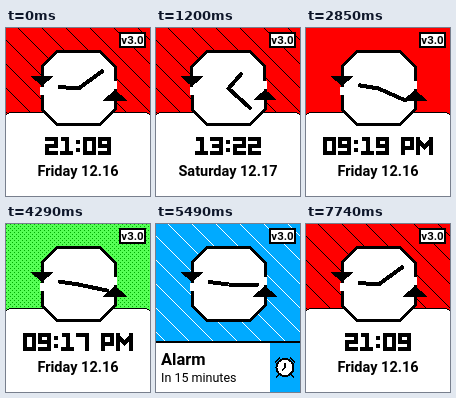
These frames come from a looping animation (144 px wide and 168 px high, 8.49 s). An HTML page:

```html
<!DOCTYPE html>
<html lang="en">
<head>
<meta charset="utf-8">
<title>Watch face</title>
<style>
html, body { margin: 0; width: 100%; height: 100%; overflow: hidden; background: #f00; }
svg { display: block; width: 100vw; height: 100vh; shape-rendering: crispEdges; }
text { font-family: Roboto, "Open Sans", sans-serif; font-weight: 700; }
.ink { fill: none; stroke: #000; }
</style>
</head>
<body>
<svg viewBox="0 0 144 168">
  <defs>
    <pattern id="tile" patternUnits="userSpaceOnUse" width="24" height="24">
      <path id="mark" fill="none"/>
    </pattern>
  </defs>
  <rect id="back" width="144" height="168"/>
  <rect width="144" height="168" fill="url(#tile)"/>

  <g id="panel">
    <path d="M-1 170V91Q-1 84.5 6 84.5H138Q145 84.5 145 91V170Z" fill="#fff" stroke="#000"/>
    <path id="digits" class="ink" stroke-width="4" role="img"/>
    <text id="date" x="72" y="148" font-size="14.5" text-anchor="middle"></text>
  </g>

  <g id="dial">
    <path id="rim" fill="#fff" stroke="#000" stroke-width="3"/>
    <path d="M36 59V67M109 61V53" stroke="#fff" stroke-width="4"/>
    <path d="M24 47.5H48L36 58.5ZM121 72.5H97L109 61.5Z"/>
  </g>
  <path id="hands" class="ink" stroke-width="4" stroke-linejoin="round" stroke-linecap="round"/>

  <g id="alarm">
    <path d="M0 117H144V168H0Z"/>
    <path d="M0 119H114V168H0Z" fill="#fff"/>
    <path d="M114 119H144V168H114Z" fill="#0af"/>
    <text x="5" y="141" font-size="16.5">Alarm</text>
    <text x="5" y="158" font-size="12.5" style="font-weight:400">In 15 minutes</text>
    <g transform="translate(129 143.5)">
      <circle r="8.5" fill="#fff" stroke="#000" stroke-width="2"/>
      <path class="ink" stroke-width="2" d="M0 -5V0L-3 3M-10 -5L-5 -10M10 -5L5 -10M-6 7L-9 10M6 7L9 10"/>
    </g>
  </g>

  <rect x="114" y="5" width="25" height="14" fill="#fff" stroke="#000" stroke-width="2"/>
  <text x="126.5" y="16" font-size="11.5" text-anchor="middle">v3.0</text>
</svg>
<script>
const LOOP = 8490;
const el = id => document.getElementById(id);
const clamp = v => Math.max(0, Math.min(1, v));
const span = (t, a, b) => clamp((t - a) / (b - a));
const easeQuad = p => p < .5 ? 2 * p * p : 1 - 2 * (1 - p) ** 2;
const easeCubic = p => p < .5 ? 4 * p ** 3 : 1 - 4 * (1 - p) ** 3;

// Block lettering: [width, stroke centre line]
const GLYPHS = {
  0: [13, 'M2 2H11V16H2Z'],
  1: [13, 'M1 2H7V16M0 16H13'],
  2: [13, 'M0 2H11V9H2V16H13'],
  3: [13, 'M0 2H11V16H0M2 9H11'],
  5: [13, 'M13 2H2V9H11V16H0'],
  6: [13, 'M13 2H2V16H11V9H2'],
  7: [13, 'M0 2H11V18'],
  8: [13, 'M2 2H11V16H2ZM2 9H11'],
  9: [13, 'M11 9H2V2H11V16H0'],
  ':': [6, 'M1 5H5M1 13H5'],
  ' ': [8, ''],
  P: [13, 'M2 18V2H11V11H2'],
  M: [17, 'M2 18V0M15 18V0M2 3L8.5 10L15 3']
};

function lettering(text) {
  const list = [...text].map(c => GLYPHS[c]);
  let x = Math.round(73 - list.reduce((sum, g) => sum + g[0] + 2, 0) / 2);
  let path = '';
  for (const [width, d] of list) {
    path += d.replace(/([MLHV])([\d.]+)(?: ([\d.]+))?/g, (_, op, a, b) =>
      op === 'H' ? `H${x + +a}` : op === 'V' ? `V${109 + +a}` : `${op}${x + +a} ${109 + +b}`);
    x += width + 2;
  }
  return path;
}

function repeat(step, draw) {
  let d = '';
  for (let y = 0; y < 24; y += step)
    for (let x = 0; x < 24; x += step) d += draw(x, y);
  return d;
}
const dot = (x, y) => `M${x} ${y + .5}h1`;
const across = (x, y) => x ? '' : `M0 ${y + .5}H24`;
const down = (x, y) => y ? '' : `M${x + .5} 0V24`;
const STRIPES = 'M11 -1L25 13M-1 11L13 25';
const PATTERNS = [
  '',
  repeat(8, dot),
  repeat(8, (x, y) => dot(x, y) + dot(x + 4, y + 4)),
  repeat(4, (x, y) => dot(x, y) + dot(x + 2, y + 2)),
  repeat(2, (x, y) => dot(x, y) + dot(x + 1, y + 1)),
  repeat(4, across),
  repeat(4, down),
  repeat(8, (x, y) => across(x, y) + down(x, y)),
  repeat(8, (x, y) => `M${x} ${y}l8 8`),
  repeat(8, (x, y) => `M${x + 8} ${y}l-8 8`),
  STRIPES
];

// Everything that changes at once: clock, date and backdrop
function scene(t) {
  const s = { h: 21, m: 9, pm: false, date: 'Friday 12.16', back: '#f00', mark: STRIPES, line: '#000' };
  if (t >= 450 && t < 2850) {
    Object.assign(s, { h: 13, m: t < 1200 ? 21 : 22, date: 'Saturday 12.17' });
  } else if (t >= 2850 && t < 5490) {
    const slot = Math.floor((t - 2850) / 120);
    s.pm = true;
    if (slot < 12) {
      s.m = slot < 8 ? 19 : 18;
      s.mark = PATTERNS[Math.min(slot, 10)];
    } else {
      s.m = slot < 20 ? 17 : 16;
      s.back = '#5f5';
      s.line = '#0a0';
      s.mark = PATTERNS[(slot - 12 + 3) % PATTERNS.length];
    }
  } else if (t >= 5490 && t < 7740) {
    Object.assign(s, { m: 15, pm: true, back: '#0af', line: '#fff' });
  }
  return s;
}

function handAngles(t, s) {
  if (t >= 240 && t < 600) {
    const p = easeQuad(span(t, 240, 600));
    return [274.5 + 126 * p, 54 + 72 * p];
  }
  return [(s.h + s.m / 60) * 30, s.m * 6];
}

function tip(deg, length) {
  const a = deg * Math.PI / 180;
  return `${72.5 + length * Math.sin(a)} ${60.5 - length * Math.cos(a)}`;
}

// Octagon that swells into a circle as round goes from 0 to 1
const CORNERS = [[-21.5, -36.5], [21.5, -36.5], [36.5, -21.5], [36.5, 21.5],
  [21.5, 36.5], [-21.5, 36.5], [-36.5, 21.5], [-36.5, -21.5]];
function rim(round) {
  const pull = ([x, y]) => {
    const k = 1 + (37.5 / Math.hypot(x, y) - 1) * round;
    return [x * k, y * k];
  };
  const at = ([x, y]) => `${72.5 + x} ${60 + y}`;
  let d = 'M' + at(pull(CORNERS[0]));
  CORNERS.forEach((from, i) => {
    const to = CORNERS[(i + 1) % 8];
    const a = pull(from), b = pull(to);
    const mid = pull([(from[0] + to[0]) / 2, (from[1] + to[1]) / 2]);
    const bend = mid.map((m, j) => 2 * m - (a[j] + b[j]) / 2);
    d += `Q${at(bend)} ${at(b)}`;
  });
  return d + 'Z';
}

const two = n => String(n).padStart(2, '0');
let shown = '';

function draw(t) {
  const s = scene(t);
  const time = s.pm ? `${two(s.h - 12)}:${two(s.m)} PM` : `${two(s.h)}:${two(s.m)}`;
  const key = time + s.date + s.back + s.mark;
  if (key !== shown) {
    shown = key;
    el('digits').setAttribute('d', lettering(time));
    el('digits').setAttribute('aria-label', time);
    el('date').textContent = s.date;
    el('back').setAttribute('fill', s.back);
    el('mark').setAttribute('d', s.mark);
    el('mark').setAttribute('stroke', s.line);
  }

  const [hour, minute] = handAngles(t, s);
  el('hands').setAttribute('d', `M${tip(hour, 19)}L72.5 60.5L${tip(minute, 29)}`);

  const drop = t < 450 ? easeQuad(span(t, 240, 450)) : 1 - easeQuad(span(t, 450, 930));
  el('panel').setAttribute('transform', `translate(0 ${Math.round(85 * drop)})`);

  const turn = easeCubic(span(t, 1140, 1920));
  el('dial').setAttribute('transform', `rotate(${-180 * turn} 72.5 60)`);
  el('rim').setAttribute('d', rim(4 * turn * (1 - turn)));

  const ringing = t >= 5490 && t < 6990;
  el('alarm').setAttribute('visibility', ringing ? 'visible' : 'hidden');
  el('panel').setAttribute('visibility', ringing ? 'hidden' : 'visible');
}

const start = performance.now();
function tick() {
  draw((performance.now() - start) % LOOP);
  requestAnimationFrame(tick);
}
tick();
</script>
</body>
</html>
```
